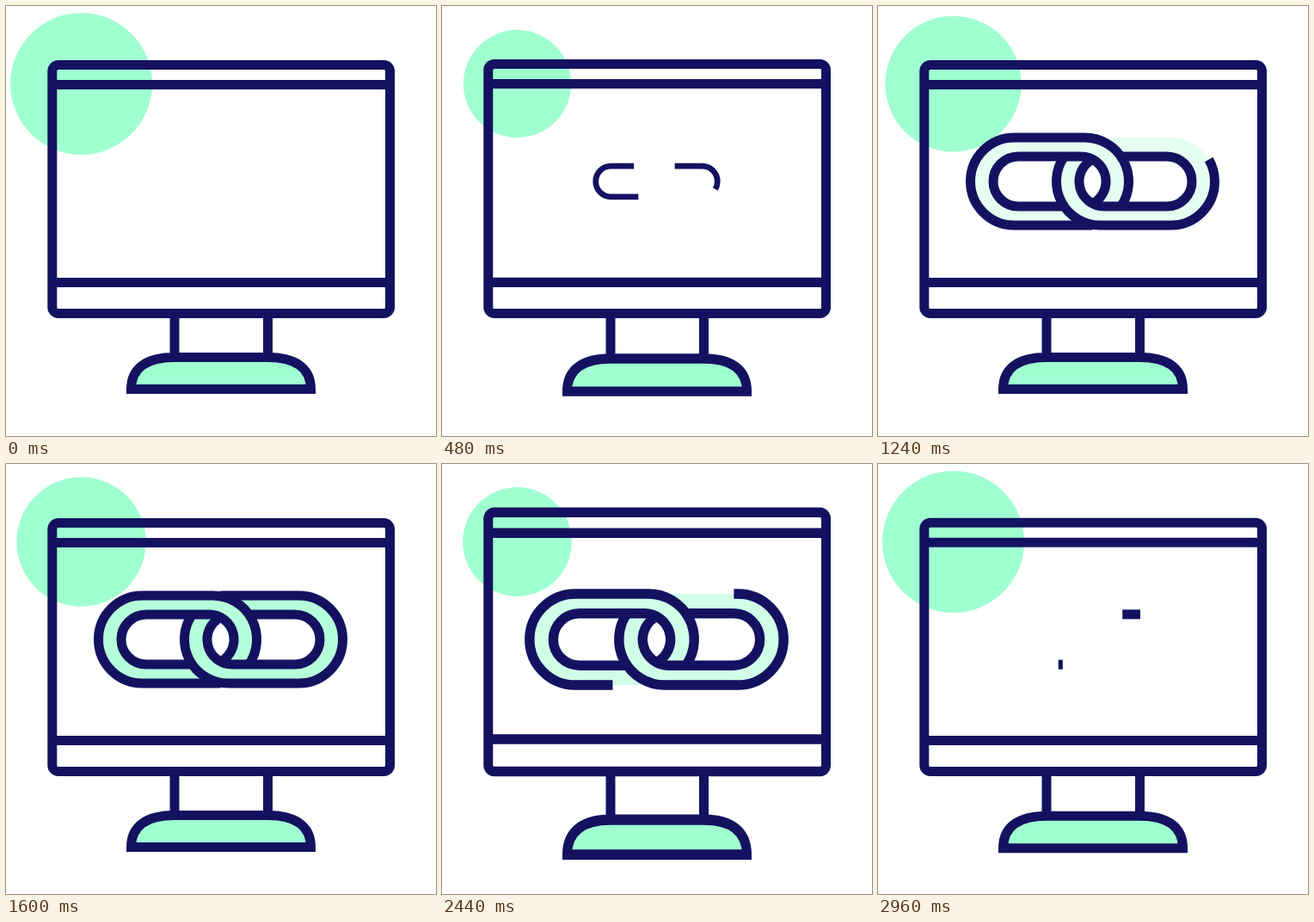
Write an HTML page that moves like this. It is 500 px wide and 500 px high and loops after 3000 ms.

```html
<!DOCTYPE html>
<html lang="en">
<head>
<meta charset="utf-8">
<title>Link on a monitor</title>
<style>
  html, body { margin: 0; width: 100%; height: 100%; overflow: hidden; background: #fff; }
  svg { display: block; width: 100vw; height: 100vh; }
  .line { fill: none; stroke: #141260; stroke-width: 11; }
  .mint { fill: #a0ffd0; }
</style>
</head>
<body>
<svg viewBox="0 0 500 500">
  <defs>
    <path id="ring" fill-rule="evenodd"
      d="M158.5 153H240.5A51 51 0 0 1 240.5 255H158.5A51 51 0 0 1 158.5 153Z
         M163 175H236A29 29 0 0 1 236 233H163A29 29 0 0 1 163 175Z"/>
  </defs>
  <circle id="dot" class="mint" cx="87.5" cy="90.5"/>
  <g id="stand" class="line">
    <path d="M196 357.5V408M304.5 357.5V408"/>
    <path class="mint" d="M145.5 445.5C145.5 420 165 408.5 196 408.5H304.5C335 408.5 354.5 420 354.5 445.5Z"/>
  </g>
  <g id="screen" class="line">
    <rect x="53.8" y="68.5" width="392.7" height="289" rx="7"/>
    <path d="M54 91.5H446M54 321.5H446"/>
  </g>
  <g id="links">
    <g id="fill" class="mint">
      <use href="#ring"/>
      <use href="#ring" transform="rotate(180 249.5 204)"/>
    </g>
    <g id="left" class="line"></g>
    <g id="right" class="line" transform="rotate(180 249.5 204)"></g>
  </g>
</svg>
<script>
const LOOP = 3000, STEP = 40;
const DRAW_IN = 600, DRAW_OUT = 430;
const OUTER = 'M282.5 233A51 51 0 0 0 240.5 153H158.5A51 51 0 0 0 158.5 255H249.5';
const INNER = 'M215 233H163A29 29 0 0 1 163 175H236A29 29 0 0 1 249.5 229.7';

const $ = id => document.getElementById(id);

const linear = u => u;
const smooth = u => u * u * (3 - 2 * u);
const cubic = u => u < .5 ? 4 * u ** 3 : 1 - 4 * (1 - u) ** 3;

// Goes from 0 to 1, beginning at start.
const ramp = (t, start, duration, ease = cubic) =>
  ease(Math.min(1, Math.max(0, (t - start) / duration)));

// Goes from 0 to 1 and back.
const pulse = (t, start, up, down, ease) =>
  ramp(t, start, up, ease) - ramp(t, start + up, down, ease);

// A stroke draws in, stays, then retracts to its start.
function makeStroke(side, d, begin, retract) {
  const path = document.createElementNS('http://www.w3.org/2000/svg', 'path');
  path.setAttribute('d', d);
  path.setAttribute('pathLength', 1);
  $(side).append(path);
  return t => {
    const shown = ramp(t, begin, DRAW_IN) - ramp(t, retract, DRAW_OUT);
    path.setAttribute('stroke-dasharray', `${shown} 2`);
    path.setAttribute('visibility', shown > .001 ? 'visible' : 'hidden');
  };
}

const strokes = [
  makeStroke('left', INNER, 150, 2600),
  makeStroke('right', INNER, 205, 2642),
  makeStroke('left', OUTER, 475, 2310),
  makeStroke('right', OUTER, 900, 2283),
];

function scaleAbout(id, x, y, sx, sy) {
  $(id).setAttribute('transform', `translate(${x} ${y}) scale(${sx} ${sy}) translate(${-x} ${-y})`);
}

function radius(t) {
  const firstDip = 20 * pulse(t, 0, 460, 430, smooth);
  const settle = 7.3 * pulse(t, 1000, 500, 1000, u => u < 1 ? 0 : 1);
  const sink = 7.3 * ramp(t, 1000, 500, smooth) + 12.4 * ramp(t, 2040, 460, smooth);
  return 82.5 - firstDip - sink + 19.7 * ramp(t, 2500, 400, smooth);
}

function draw(t) {
  const enter = pulse(t, 400, 240, 360);
  const leave = pulse(t, 2200, 480, 380);
  const jump = enter + leave;
  const linkSize = ramp(t, 300, 340) + .2 * enter + .08 * leave;

  $('dot').setAttribute('r', radius(t));
  scaleAbout('stand', 0, 357.5, 1, 1 + .2 * jump);
  scaleAbout('screen', 0, 357.5, 1, 1 + .17 * jump ** 2);
  scaleAbout('links', 249.5, 204, linkSize, linkSize);
  $('fill').setAttribute('opacity', ramp(t, 1040, 720, linear) - ramp(t, 2280, 320, linear));
  strokes.forEach(update => update(t));
}

const start = performance.now();
function tick() {
  const t = (performance.now() - start) % LOOP;
  draw(Math.floor(t / STEP) * STEP);
  requestAnimationFrame(tick);
}
tick();
</script>
</body>
</html>
```
